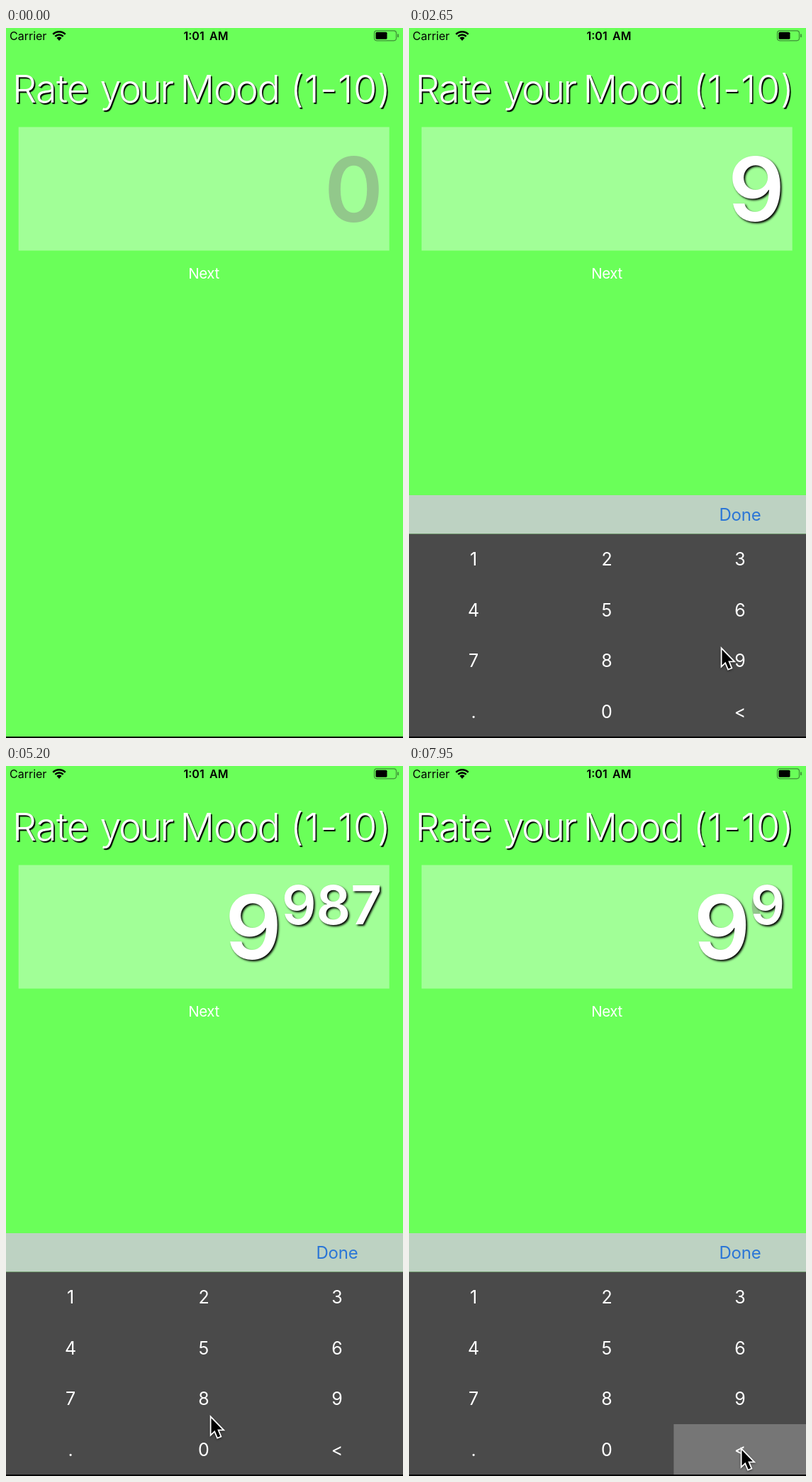
An HTML page with a canvas that plays this animation: 560 px wide and 1000 px high, repeating every 8 s.

```html
<!DOCTYPE html>
<html lang="en">
<head>
<meta charset="utf-8">
<title>Mood rating</title>
<style>
  html, body { margin: 0; width: 100%; height: 100%; overflow: hidden; background: #6aff59; }
  canvas { display: block; }
</style>
</head>
<body>
<canvas id="stage" width="560" height="1000"></canvas>
<script>
const ctx = document.getElementById('stage').getContext('2d');
const LOOP = 8000, STEP = 50;
const KEYS = ['123', '456', '789', '.0<'];
const KEY_W = 187, KEY_H = 71.5, PAD_TOP = 712.5, BAR_H = 54.5;

// time, value shown, column and row of the pressed key
const presses = [
  [2350, '9', 2, 2], [3150, '9.', 0, 3], [3800, '9.9', 2, 2], [4200, '9.98', 1, 2],
  [4650, '9.987', 0, 2], [7200, '9.98', 2, 3], [7900, '9.9', 2, 3]
];

// time, x and y of the pointer tip
const pointerPath = [
  [1300, 560, 440], [1600, 422.5, 338], [1680, 416, 280], [1850, 416, 280],
  [2250, 440, 872], [2650, 440, 872], [3050, 85, 950], [3250, 85, 950],
  [3700, 462, 875], [3900, 462, 875], [4150, 275, 882], [4300, 275, 882],
  [4550, 86, 890], [4950, 86, 890], [5450, 490, 940], [5700, 490, 940],
  [6100, 440, 520], [6300, 440, 520], [6750, 468, 951], [7000, 468, 960], [8000, 468, 960]
];

const clamp = v => Math.max(0, Math.min(1, v));
const smooth = v => v * v * (3 - 2 * v);

function rect(x, y, w, h, color) {
  ctx.fillStyle = color;
  ctx.fillRect(x, y, w, h);
}

function text(str, x, y, size, { color = '#fff', weight = 400, align = 'center', spacing = 0, shadow = 0, offset = 2 } = {}) {
  ctx.save();
  ctx.font = `${weight} ${size}px Inter, sans-serif`;
  ctx.letterSpacing = spacing + 'px';
  ctx.textAlign = align;
  ctx.fillStyle = color;
  if (shadow) {
    ctx.shadowColor = '#000';
    ctx.shadowOffsetX = ctx.shadowOffsetY = offset;
    ctx.shadowBlur = shadow;
  }
  ctx.fillText(str, x, y);
  const width = ctx.measureText(str).width;
  ctx.restore();
  return width;
}

function drawStatusBar() {
  text('Carrier', 5, 17, 16, { color: '#000', align: 'left' });
  text('1:01', 250.5, 17, 16, { color: '#000', weight: 600, align: 'left' });
  text('AM', 313.5, 17, 16, { color: '#000', weight: 600, align: 'right' });

  ctx.strokeStyle = ctx.fillStyle = '#000';
  ctx.lineWidth = 2.6;
  for (const r of [12.3, 8]) {
    ctx.beginPath();
    ctx.arc(75, 17.5, r, -Math.PI * 0.75, -Math.PI * 0.25);
    ctx.stroke();
  }
  ctx.beginPath();
  ctx.moveTo(75, 18);
  ctx.arc(75, 17.5, 5, -Math.PI * 0.75, -Math.PI * 0.25);
  ctx.fill();

  ctx.strokeStyle = '#3f8f38';
  ctx.lineWidth = 1.2;
  ctx.beginPath();
  ctx.roundRect(519.5, 3.8, 31, 14, 3.5);
  ctx.stroke();
  ctx.fillStyle = '#000';
  ctx.beginPath();
  ctx.roundRect(521.5, 5.8, 16, 10, 1.5);
  ctx.fill();
  rect(552, 8.5, 1.8, 4.6, '#3f8f38');
}

function drawForm(value) {
  const titleStyle = { weight: 350, align: 'left', shadow: 1, offset: 1.7 };
  [['Rate', 9, -0.8], ['your', 132.5, -2.6], ['Mood', 245.5, -1.2], ['(1-10)', 401, 0.8]]
    .forEach(([word, x, spacing]) => text(word, x, 105, 54, { ...titleStyle, spacing }));

  rect(17.7, 139.5, 523, 174, '#a1ff97');
  const ghost = { color: '#92c88b', weight: 600, align: 'right' };
  const digit = { weight: 600, align: 'right', shadow: 3 };
  if (!value) {
    text('0', 532, 273, 126, ghost);
  } else {
    const [whole, decimals] = value.split('.');
    let right = 530;
    if (decimals !== undefined) {
      const ghostWidth = decimals.length < 2 ? text('0', right, 223, 76, ghost) : 0;
      right -= decimals ? text(decimals, right, 223, 76, digit) : ghostWidth;
    }
    text(whole, right, 272, 125, digit);
  }
  text('Next', 279, 352.5, 20.5, { spacing: -0.4 });
}

function drawKeypad(t, press) {
  const slide = 1 - clamp((t - 1650) / 400);
  if (slide === 1) return;
  ctx.save();
  ctx.translate(0, (1000 - PAD_TOP + BAR_H) * slide ** 3);
  rect(0, PAD_TOP - BAR_H, 560, BAR_H, '#bdd2c2');
  text('Done', 467, 693.5, 24, { color: '#2b76d6', spacing: -0.2 });
  rect(0, PAD_TOP, 560, 286, '#4a4a4a');
  if (press && t - press[0] < 120) {
    rect(press[2] * 186.7, PAD_TOP + press[3] * KEY_H, KEY_W, KEY_H, '#767676');
  }
  KEYS.forEach((row, r) => [...row].forEach((key, c) =>
    text(key, 91 + c * 188, 757 + r * KEY_H, 25)));
  ctx.restore();
}

function drawPointer(t) {
  const next = pointerPath.findIndex(p => p[0] > t);
  if (next < 1) return;
  const [t0, x0, y0] = pointerPath[next - 1], [t1, x1, y1] = pointerPath[next];
  const k = smooth((t - t0) / (t1 - t0));
  ctx.save();
  ctx.translate(x0 + (x1 - x0) * k, y0 + (y1 - y0) * k);
  const arrow = new Path2D('M1.5 3.5V25.5L6.5 20.7L10.6 30.5L14.2 29L10.2 19.4H17Z');
  ctx.strokeStyle = '#fff';
  ctx.lineWidth = 3.6;
  ctx.shadowColor = 'rgba(0,0,0,.45)';
  ctx.shadowOffsetY = 1.5;
  ctx.shadowBlur = 3;
  ctx.stroke(arrow);
  ctx.shadowColor = 'transparent';
  ctx.fillStyle = '#000';
  ctx.fill(arrow);
  ctx.restore();
}

function frame(now) {
  const t = Math.floor(now % LOOP / STEP) * STEP;
  const press = presses.filter(p => p[0] <= t).pop();
  rect(0, 0, 560, 1000, '#6aff59');
  drawStatusBar();
  drawForm(press ? press[1] : '');
  drawKeypad(t, press);
  drawPointer(t);
  rect(0, 998, 560, 2, '#000');
  requestAnimationFrame(frame);
}
requestAnimationFrame(frame);
</script>
</body>
</html>
```
